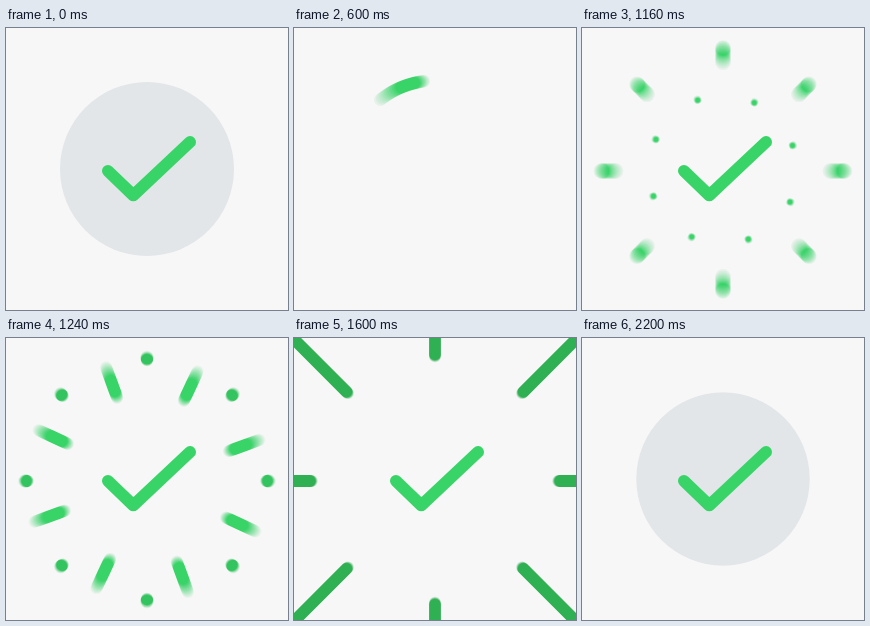
These frames come from a looping animation (282 px wide and 282 px high, 2480 ms). An HTML page with a canvas:

```html
<!DOCTYPE html>
<html lang="en">
<head>
<meta charset="utf-8">
<title>Success check</title>
<style>
html, body { margin: 0; width: 100%; height: 100%; overflow: hidden; background: #f7f7f7; }
canvas { display: block; width: 282px; height: 282px; }
</style>
</head>
<body>
<canvas id="stage" width="282" height="282"></canvas>
<script>
const SIZE = 282, MID = 141, LOOP = 2480, STEP = 40;
const SHUTTER = 20, SAMPLES = 14;
const BG = '#f7f7f7', GREY = '#e2e6e9';
const LIGHT = [56, 212, 104], DARK = [47, 176, 83];

const view = document.getElementById('stage').getContext('2d');
const layer = document.createElement('canvas');
layer.width = layer.height = SIZE;
const g = layer.getContext('2d');

const progress = (t, from, to) => Math.min(1, Math.max(0, (t - from) / (to - from)));
const ease = (t, from, to) => {
  const p = progress(t, from, to);
  return p * p * (3 - 2 * p);
};
const mix = (a, b, p) => a.map((v, i) => v + (b[i] - v) * p);
const radians = deg => deg * Math.PI / 180;

function pen(color, width) {
  g.strokeStyle = `rgb(${color.map(Math.round).join()})`;
  g.lineWidth = width;
  g.beginPath();
}

function disc(t) {
  g.fillStyle = GREY;
  g.beginPath();
  g.arc(MID, MID, 87 * Math.sin(progress(t, 1640, 2240) * Math.PI / 2), 0, 7);
  g.fill();
}

// The head slows at the top of each lap while the tail catches up
function spinner(t) {
  const end = 652;
  if (t >= end) return;
  const lap = (t - 320) / 278;
  const head = Math.min(720, 348.5 + 360 * lap - 41 * Math.sin(2 * Math.PI * lap));
  const tail = 720 - 488 * ((end - t) / 332) ** 1.5;
  pen(LIGHT, 12.4);
  g.arc(MID, MID - 1, 87.5, radians(tail - 90), radians(head - 90));
  g.stroke();
}

function check(t) {
  const p = ease(t, 700, 960);
  if (!p) return;
  pen(LIGHT, 12);
  g.setLineDash(p < 1 ? [113 * p, 200] : []);
  g.moveTo(102, 143);
  g.lineTo(127.3, 167.3);
  g.lineTo(184, 114);
  g.stroke();
  g.setLineDash([]);
}

function rays(turn, inner, outer, width, color) {
  if (width <= 0) return;
  pen(color, width);
  for (let i = 0; i < 8; i++) {
    const c = Math.cos(radians(i * 45 + turn)), s = Math.sin(radians(i * 45 + turn));
    const y = 141.5 + 1.5 * c * c; // sideways rays sit slightly lower
    g.moveTo(MID + inner * c, y + inner * s);
    g.lineTo(MID + (outer + 0.01) * c, y + outer * s);
  }
  g.stroke();
}

// Dots spring outwards, stretch into lines, then leave the stage
function mainRays(t) {
  const d = t - 1160;
  const rest = Math.max(0, 116 + 30 * Math.exp(-d / 45) * Math.sin(d / 40));
  const inner = rest + 100 * ease(t, 1480, 2160);
  const outer = rest + 110 * ease(t, 1240, 1600);
  const width = ease(t, 1080, 1140) * (15.5 - 3.7 * ease(t, 1170, 1270));
  rays(0, inner, outer, width, mix(LIGHT, DARK, progress(t, 1180, 1340)));
}

function sideRays(t) {
  const inner = 74 + 90 * ease(t, 1160, 1450);
  const outer = inner + 60 * ease(t, 1160, 1360);
  rays(25, inner, outer, 12 * ease(t, 1120, 1200), LIGHT);
}

function scene(t) {
  g.fillStyle = BG;
  g.fillRect(0, 0, SIZE, SIZE);
  g.lineCap = g.lineJoin = 'round';
  disc(t);
  spinner(t);
  sideRays(t);
  mainRays(t);
  check(t);
}

// Average several moments inside the shutter for motion blur
function expose(t, shutter) {
  const n = shutter ? SAMPLES : 1;
  for (let k = 0; k < n; k++) {
    scene(t + shutter * ((k + 0.5) / n - 0.5));
    view.globalAlpha = 1 / (k + 1);
    view.drawImage(layer, 0, 0);
  }
}

let shown = -1;
function tick() {
  const now = performance.now() % LOOP;
  const t = now < 200 ? LOOP : Math.min(2200, Math.floor(now / STEP) * STEP);
  if (t !== shown) {
    shown = t;
    expose(t, t === LOOP ? 0 : SHUTTER);
  }
  requestAnimationFrame(tick);
}
tick();
</script>
</body>
</html>
```
